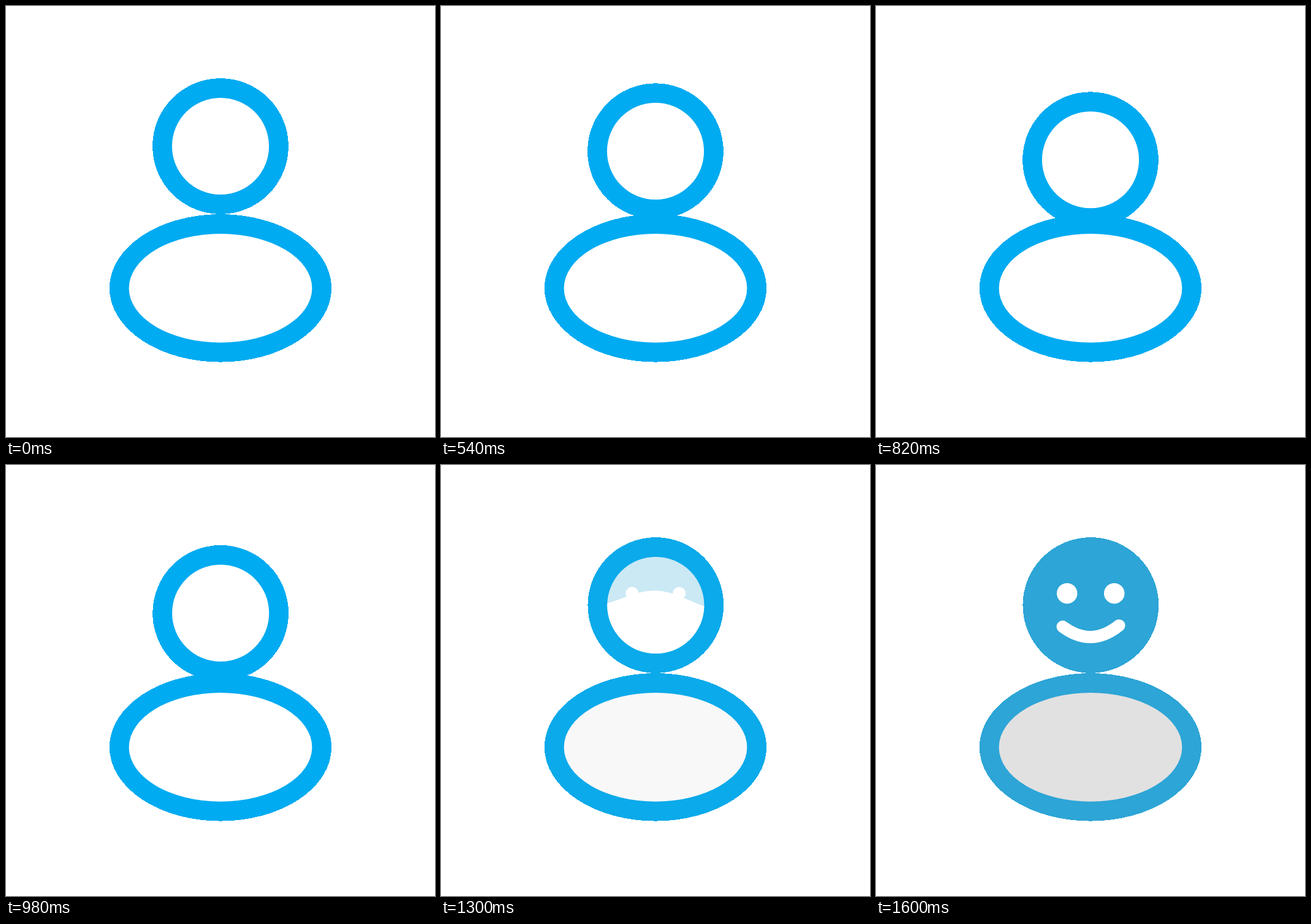
An HTML page for the animation above (1.8 s loop, 700 by 704 pixels).

```html
<!DOCTYPE html>
<html lang="en">
<head>
<meta charset="utf-8">
<title>Smiling figure</title>
<style>
html, body { margin: 0; width: 100%; height: 100%; overflow: hidden; background: #fff; }
svg { display: block; width: 100%; height: 100%; }
.outer { shape-rendering: crispEdges; }
</style>
</head>
<body>
<svg viewBox="0 0 700 704">
  <clipPath id="inside"><circle r="79.1" cx="350" cy="229"/></clipPath>
  <g id="figure">
    <ellipse class="outer" cx="350" cy="460.8" rx="181.2" ry="120.8"/>
    <ellipse id="belly" cx="350" cy="460.9" rx="149.4" ry="88.9"/>
    <g id="head">
      <circle class="outer" cx="350" cy="229" r="110.9"/>
      <circle id="skin" cx="350" cy="229" r="79.1"/>
      <g id="face" fill="#fff">
        <path id="mouth" clip-path="url(#inside)"/>
        <circle class="eye" cx="311.4" cy="209.7"/>
        <circle class="eye" cx="388.4" cy="209.7"/>
      </g>
    </g>
  </g>
</svg>
<script>
const LOOP = 1800, STEP = 20, DROP = 23.4;
const BLUE = [0, 171, 241], STEEL = [45, 165, 214];
const WHITE = [255, 255, 255], GREY = [225, 225, 225];

const $ = id => document.getElementById(id);
const clamp = x => Math.min(1, Math.max(0, x));
const lerp = (a, b, k) => a + (b - a) * k;
const mix = (a, b, k) => `rgb(${a.map((v, i) => Math.round(lerp(v, b[i], k)))})`;
const eyes = document.querySelectorAll('.eye');

// Mirrored outline: arched top edge, half-circle caps, parabolic bottom.
function drawMouth(p) {
  const k = (p - 0.55) / 0.45;
  const at = (wide, smile) => lerp(wide, smile, k);
  const cx = 349.5;
  const topX = at(70.5, 39.6), topY = at(241, 255.4), midY = at(231.5, 271);
  const endX = at(24, 13), endY = at(0, 10), midX = at(25, 13);
  const lowX = at(90, 52.4), lowY = at(300, 270.8), lowMid = at(330, 291);
  const r = Math.hypot(lowX - topX, lowY - topY) / 2;

  $('mouth').setAttribute('d',
    `M${cx - topX} ${topY}` +
    `C${cx - topX + endX} ${topY + endY} ${cx - midX} ${midY} ${cx} ${midY}` +
    `S${cx + topX - endX} ${topY + endY} ${cx + topX} ${topY}` +
    `A${r} ${r} 0 0 1 ${cx + lowX} ${lowY}` +
    `Q${cx} ${2 * lowMid - lowY} ${cx - lowX} ${lowY}` +
    `A${r} ${r} 0 0 1 ${cx - topX} ${topY}Z`);
  $('mouth').setAttribute('transform', `rotate(${at(0.5, -1.2)} 350 229)`);
}

function draw(t) {
  const down = clamp((t - 400) / 400);
  const up = clamp((t - 800) / 400);
  const p = clamp((t - 1200) / 400);

  $('head').setAttribute('transform', `translate(${0.35 * up} ${DROP * (down - up)})`);
  $('figure').setAttribute('fill', mix(BLUE, STEEL, p));
  $('belly').setAttribute('fill', mix(WHITE, GREY, p));
  $('skin').setAttribute('fill', mix(WHITE, STEEL, p));
  $('face').setAttribute('visibility', p > 0 ? 'visible' : 'hidden');
  drawMouth(p);
  eyes.forEach(e => e.setAttribute('r', 16.8 * lerp(0.5, 1, p)));
}

const start = performance.now();
function tick() {
  const t = (performance.now() - start) % LOOP;
  draw(Math.floor(t / STEP) * STEP);
  requestAnimationFrame(tick);
}
draw(0);
requestAnimationFrame(tick);
</script>
</body>
</html>
```
